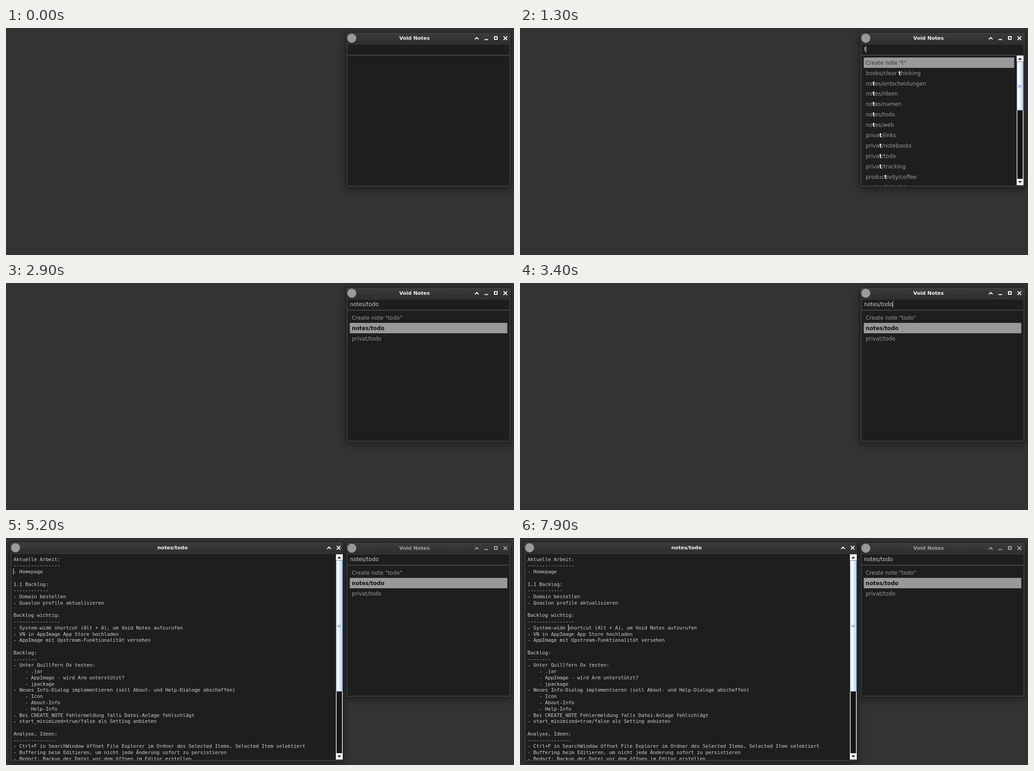
These frames come from a looping animation (1118 px wide and 501 px high, 8000 ms). An HTML page with a canvas:

```html
<!DOCTYPE html>
<html lang="de">
<head>
<meta charset="utf-8">
<title>Void Notes</title>
<style>
  html, body { margin: 0; width: 100%; height: 100%; overflow: hidden; background: #333; }
  canvas { display: block; }
</style>
</head>
<body>
<canvas id="stage" width="1118" height="501"></canvas>
<script>
const ctx = document.getElementById('stage').getContext('2d');
const LOOP = 8000;
const SANS = '11.8px "DejaVu Sans", sans-serif';
const BOLD = 'bold ' + SANS;
const MONO = '11px "DejaVu Sans Mono", monospace';
const TITLE = 'bold 11px "DejaVu Sans", sans-serif';
const LINE = 13.76, COLUMN = 6.42, ROW = 22.92, BAR = 15;

const allNotes = ['books/clear thinking', 'notes/entscheidungen', 'notes/ideen', 'notes/namen',
  'notes/todo', 'notes/web', 'privat/links', 'privat/notebooks', 'privat/todo',
  'privat/tracking', 'productivity/coffee', 'productivity/ideen'];
const todoNotes = ['notes/todo', 'privat/todo'];

// Search window: start time, field text, caret shown, query, selected row
const searchSteps = [
  [0, '', false], [300, '', true], [800, '', false], [1200, 't', true],
  [1300, 't', true, 't', 0], [1500, 'to', true, 'to', 0], [1600, 'tod', true, 'tod', 0],
  [1700, 'todo', true, 'todo', 0], [2300, 'todo', false, 'todo', 0],
  [2500, 'notes/todo', true, 'todo', 1], [2900, 'notes/todo', false, 'todo', 1],
  [3200, 'privat/todo', true, 'todo', 2], [3400, 'notes/todo', true, 'todo', 1],
  [3600, 'notes/todo', false, 'todo', 1],
];

// Editor caret: start time, line (-1 = hidden), column
const caretSteps = [
  [3600, 0, 0], [4100, -1, 0], [4700, 0, 0], [4800, 1, 0], [5200, 2, 0], [5300, 4, 0],
  [5400, 6, 0], [5900, 7, 0], [6100, 8, 0], [6600, 11, 0], [6900, 10, 0], [7400, 11, 0],
  [7700, 11, 2], [7900, 11, 14],
];

const noteLines = `Aktuelle Arbeit:
----------------
- Homepage

1.1 Backlog:
------------
- Domain bestellen
- Quaslon profile aktualisieren

Backlog wichtig:
----------------
- System-wide shortcut (Alt + A), um Void Notes aufzurufen
- VN in AppImage App Store hochladen
- AppImage mit Upstream-Funktionalität versehen

Backlog:
--------
- Unter Quillfern Ox testen:
    - .jar
    - AppImage - wird Arm unterstützt?
    - jpackage
- Neues Info-Dialog implementieren (soll About- und Help-Dialoge abschaffen)
    - Icon
    - About-Info
    - Help-Info
- Bei CREATE_NOTE Fehlermeldung falls Datei-Anlage fehlschlägt
- start_minimized=true/false als Setting anbieten

Analyse, Ideen:
---------------
- Ctrl+F in SearchWindow öffnet File Explorer im Ordner des Selected Items, Selected Item selektiert
- Buffering beim Editieren, um nicht jede Änderung sofort zu persistieren
- Bedarf: Backup der Datei vor dem öffnen im Editor erstellen`.split('\n');

const stepAt = (steps, t) => steps.filter(step => step[0] <= t).pop();

function rect(color, x, y, w, h) {
  ctx.fillStyle = color;
  ctx.fillRect(x, y, w, h);
}

function frame(color, x, y, w, h) {
  ctx.strokeStyle = color;
  ctx.lineWidth = 1;
  ctx.strokeRect(x + .5, y + .5, w - 1, h - 1);
}

// Draws text and returns its width
function text(str, x, y, color, font = SANS) {
  ctx.font = font;
  ctx.fillStyle = color;
  ctx.fillText(str, x, y);
  return ctx.measureText(str).width;
}

function lines(color, width, ...paths) {
  ctx.strokeStyle = color;
  ctx.lineWidth = width;
  ctx.beginPath();
  for (const path of paths) path.forEach(([x, y], i) => i ? ctx.lineTo(x, y) : ctx.moveTo(x, y));
  ctx.stroke();
}

function clipped(x, y, w, h, draw) {
  ctx.save();
  ctx.beginPath();
  ctx.rect(x, y, w, h);
  ctx.clip();
  draw();
  ctx.restore();
}

function drawWindow(x, y, w, h, title, active, fullButtons) {
  ctx.save();
  ctx.shadowColor = 'rgba(0,0,0,.38)';
  ctx.shadowBlur = 18;
  ctx.shadowOffsetY = 4;
  ctx.fillStyle = '#2e2e2e';
  ctx.beginPath();
  ctx.roundRect(x, y, w, h, [5, 5, 1, 1]);
  ctx.fill();
  ctx.restore();

  const shade = ctx.createLinearGradient(0, y, 0, y + 27);
  shade.addColorStop(0, '#3d3d3d');
  shade.addColorStop(1, '#2d2d2d');
  ctx.fillStyle = shade;
  ctx.beginPath();
  ctx.roundRect(x + 1, y + 1, w - 2, 26, [4, 4, 0, 0]);
  ctx.fill();
  ctx.strokeStyle = '#181818';
  ctx.lineWidth = 1;
  ctx.beginPath();
  ctx.roundRect(x + .5, y + .5, w - 1, h - 1, [5, 5, 1, 1]);
  ctx.stroke();

  const middle = y + 13.5, color = active ? '#fff' : '#a8a8a8';
  ctx.fillStyle = '#9a9a9a';
  ctx.beginPath();
  ctx.arc(x + 14, middle, 10, 0, 7);
  ctx.fill();

  ctx.textAlign = 'center';
  text(title, fullButtons ? 899 : 366.5, y + 17, active ? '#f2f2f2' : '#a0a0a0', TITLE);
  ctx.textAlign = 'left';

  const close = fullButtons ? 1099 : 732, up = fullButtons ? 1036 : 711;
  lines(color, 2,
    [[close - 4, middle - 4], [close + 4, middle + 4]],
    [[close - 4, middle + 4], [close + 4, middle - 4]],
    [[up - 4, middle + 2.5], [up, middle - 1.5], [up + 4, middle + 2.5]]);
  if (fullButtons) {
    rect(color, 1053, 24.5, 8, 2);
    ctx.strokeStyle = color;
    ctx.lineWidth = 2;
    ctx.strokeRect(1075, 19, 6, 6);
  }
}

function arrowButton(x, y, direction) {
  rect('#eee', x, y, BAR, 14);
  frame('#fff', x, y, BAR, 14);
  const cx = x + BAR / 2, cy = y + 7;
  ctx.fillStyle = '#111';
  ctx.beginPath();
  ctx.moveTo(cx - 4, cy - 2 * direction);
  ctx.lineTo(cx + 4, cy - 2 * direction);
  ctx.lineTo(cx, cy + 2 * direction);
  ctx.fill();
}

function scrollbar(x, top, bottom, thumbEnd) {
  rect('#161616', x, top, BAR, bottom - top);
  rect('#e8eef4', x, top, 1.5, bottom - top);
  rect('#e8eef4', x + BAR - 1.5, top, 1.5, bottom - top);
  arrowButton(x, top, -1);
  arrowButton(x, bottom - 14, 1);

  const thumbTop = top + 13, center = Math.round((thumbTop + thumbEnd) / 2);
  const shade = ctx.createLinearGradient(x, 0, x + BAR, 0);
  shade.addColorStop(0, '#d5e3f1');
  shade.addColorStop(.3, '#fff');
  shade.addColorStop(1, '#b5cde6');
  rect(shade, x, thumbTop, BAR, thumbEnd - thumbTop);
  frame('#6d8cc2', x, thumbTop, BAR, thumbEnd - thumbTop);
  for (let i = -2; i <= 2; i += 2) rect('#7f9bcb', x + 3, center + i, 8, 1);
}

function drawRow(label, index, query, selected, marked, width) {
  const top = 65.1 + index * ROW, baseline = top + 15.6;
  let x = 761;
  if (index === selected) {
    rect('#999', 756.6, top, width, ROW);
    text(label, x, baseline, index ? '#111' : '#333', index ? BOLD : SANS);
    return;
  }
  const start = marked ? label.indexOf(query) : -1;
  if (start < 0) {
    text(label, x, baseline, '#999');
    return;
  }
  x += text(label.slice(0, start), x, baseline, '#999');
  x += text(query, x, baseline, '#eee', BOLD);
  text(label.slice(start + query.length), x, baseline, '#999');
}

function drawSearch(t) {
  const [, field, caret, query, selected] = stepAt(searchSteps, t);
  drawWindow(747, 9, 366, 344, 'Void Notes', t < 3600, true);
  rect('#1e1e1e', 752, 36, 356, 312);
  frame('#404040', 751, 35, 358, 314);
  rect('#444', 752, 59, 356, 2);
  const width = text(field, 757, 51.4, '#ccc');
  if (caret) rect('#eee', 757 + Math.floor(width), 40, 1, 14);
  if (!query) return;

  const long = query === 't';
  clipped(752, 61, 356, 287, () => {
    const labels = [`Create note "${query}"`, ...(long ? allNotes : todoNotes)];
    labels.forEach((label, i) =>
      drawRow(label, i, query, selected, i > 0 && selected === 0, long ? 331 : 346.6));
    if (long) scrollbar(1093, 61, 347, 182);
  });
}

function drawEditor(t) {
  drawWindow(7, 8, 736, 487, 'notes/todo', true, false);
  rect('#1e1e1e', 12, 35, 729, 455);
  frame('#404040', 11, 34, 731, 457);
  clipped(12, 36, 714, 454, () => {
    ctx.letterSpacing = '-0.2px';
    noteLines.forEach((line, i) => text(line, 16.5, 50.5 + i * LINE, '#ccc', MONO));
    ctx.letterSpacing = '0px';
    const [, line, column] = stepAt(caretSteps, t);
    if (line >= 0) {
      rect('#eee', Math.round(16 + column * COLUMN), Math.round(39.4 + line * LINE), 1, 14);
    }
  });
  scrollbar(726, 36, 489, 339);
}

function render() {
  const t = performance.now() % LOOP;
  rect('#333', 0, 0, 1118, 501);
  drawSearch(t);
  if (t >= 3600) drawEditor(t);
  requestAnimationFrame(render);
}
render();
</script>
</body>
</html>
```
